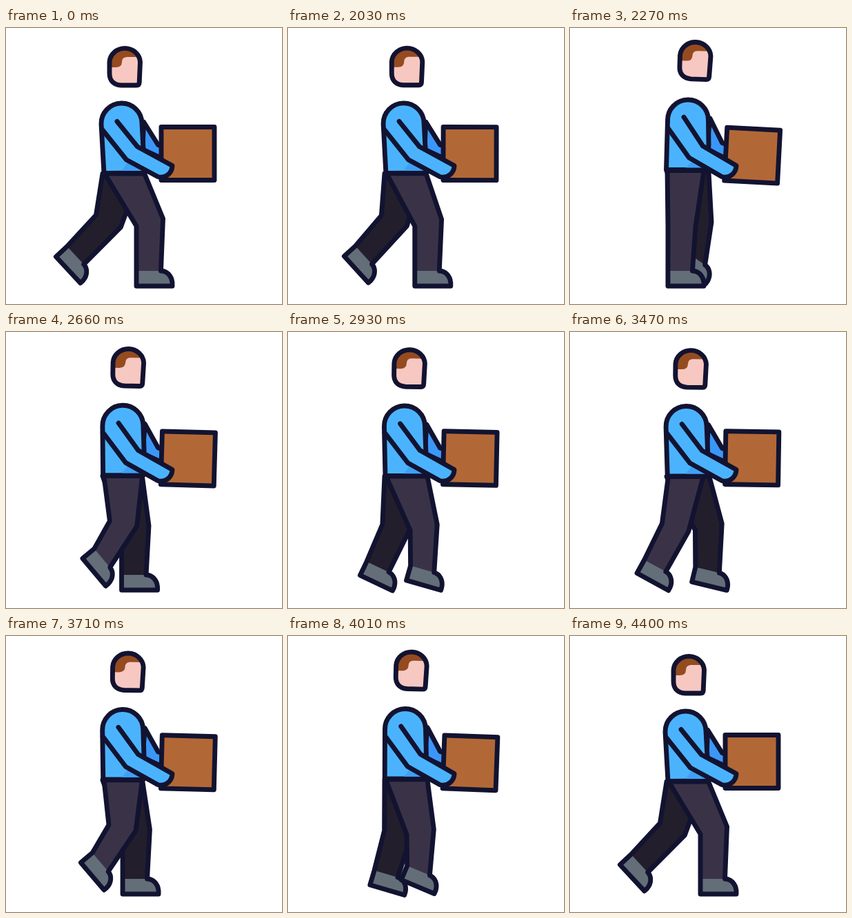
An HTML page for the animation above (4.43 s loop, 400 px wide and 400 px high).

```html
<!DOCTYPE html>
<html lang="en">
<head>
<meta charset="utf-8">
<title>Carrying a box</title>
<style>
  html, body { margin: 0; width: 100%; height: 100%; overflow: hidden; background: #fff; }
  svg { display: block; width: 100vw; height: 100vh; }
  .line { stroke: #121331; stroke-width: 6.9; stroke-linejoin: round; stroke-linecap: round; }
</style>
</head>
<body>
<svg viewBox="0 0 400 400">
  <path id="farArm" class="line" fill="#3b97f7"/>
  <g id="farLeg"><path fill="#231e2b"/><path fill="#646e78"/><path class="line" fill="none"/></g>
  <g id="nearLeg"><path fill="#3a3347"/><path fill="#646e78"/><path class="line" fill="none"/></g>
  <path id="torso" class="line" fill="#4bb3fd"/>
  <path id="shade" fill="#3fa0f6"/>
  <rect id="box" class="line" x="225" y="143.5" width="77" height="77" fill="#b26836"/>
  <path id="nearArm" class="line" fill="#4bb3fd"/>
  <g id="head">
    <path id="face" fill="#f7c8c1" d="M150 49A22.3 21 0 0 1 194.5 49L193.2 79Q193 83 189 83H167C156 82.5 150 76 150 66Z"/>
    <path fill="#954b20" d="M150 57V49A22.3 21 0 0 1 193 42H175Q168 42.5 168 49Q168 57 159 57Z"/>
    <path id="headLine" class="line" fill="none"/>
  </g>
</svg>
<script>
const LOOP = 4430, HOLD = 2000, STEP = 30, STEPS = 80;
const $ = id => document.getElementById(id);
const set = (id, d) => $(id).setAttribute('d', d);
const move = (id, x, y, turn) => $(id).setAttribute('transform', `translate(${x} ${y}) rotate(${turn})`);
const mix = (a, b, u) => a + (b - a) * u;
set('headLine', $('face').getAttribute('d'));

// Key poses of one leg over a cycle of two strides
const gait = [
  { at: 0, knee: [189, 287], ankle: [189, 352], tilt: 0 },        // contact
  { at: .516, knee: [142, 288], ankle: [142, 352], tilt: 0 },     // passing
  { at: 1, knee: [128, 271], ankle: [86, 316.5], tilt: 47 },      // push-off
  { at: 1.27, knee: [151, 274], ankle: [129, 314], tilt: 50 },    // lift
  { at: 1.516, knee: [163, 288], ankle: [164, 323], tilt: 35 }    // swing
];

function drawLeg(id, phase, dx, hipX, hipY) {
  const q = phase % 2;
  const i = gait.findLastIndex(g => g.at <= q);
  const a = gait[i], b = gait[i + 1] || { ...gait[0], at: 2 };
  const u = (q - a.at) / (b.at - a.at);
  const joint = name => [mix(a[name][0], b[name][0], u) + dx, mix(a[name][1], b[name][1], u)];
  const [kx, ky] = joint('knee'), [ax, ay] = joint('ankle');

  const r = mix(a.tilt, b.tilt, u) * Math.PI / 180, s = Math.sin(r), c = Math.cos(r);
  const foot = (x, y) => `${ax + x * c - y * s} ${ay + x * s + y * c}`;
  const shoe = `${foot(0, 0)}L${foot(0, 22)}L${foot(52, 22)}L${foot(52, 17)}` +
    `C${foot(51, 7)} ${foot(44, 0)} ${foot(35.5, 0)}`;

  // The front of the knee lies across the bisector of thigh and shin
  const lean = (Math.atan2(hipX - kx, ky - hipY) + Math.atan2(kx - ax, ay - ky)) / 2;
  const front = `${kx + 40 * Math.cos(lean)} ${ky + 40 * Math.sin(lean)}`;
  const hipFront = 197.5 + 4.5 * Math.cos(Math.PI * (q + .25));

  const leg = `M${hipX} ${hipY}L${kx} ${ky}L${shoe}L${front}L${hipFront} ${hipY}Z`;
  [leg, `M${shoe}Z`, leg].forEach((d, n) => $(id).children[n].setAttribute('d', d));
}

// Steady walk that eases out into the resting pose
function stride(k) {
  const speed = .0574, from = 50;
  if (k < from) return k * speed;
  const left = 4 - from * speed, span = STEPS - from;
  return 4 - left * ((STEPS - k) / span) ** (speed * span / left);
}

function draw(p) {
  const bob = Math.sin(Math.PI * p) ** 2;
  const m = (a, b) => mix(a, b, bob);
  const pt = (x, y, dx, dy) => `${x + dx * bob} ${y + dy * bob}`;
  const waist = m(210, 205.5);

  drawLeg('farLeg', p + 1, 2.5, 140, waist + 1);
  drawLeg('nearLeg', p, 0, m(143, 141), waist + 1);
  set('farArm', `M${pt(199.5, 136, 3.5, -5)}L${pt(220.5, 169.5, 0, -3)}L228 ${m(171, 169)}V190L198 176Z`);
  set('torso', `M${pt(138, 139, 3.5, -5)}A29.5 29.5 0 0 1 ${pt(197, 138, 3.5, -5)}` +
    `L${pt(199, 175, 2, -5)}L${pt(201, 210, -4, -4.5)}L${pt(142, 210.5, -2.5, -5)}Z`);
  set('shade', `M178 192L196 ${waist - 3}H168Z`);
  set('nearArm', `M${pt(161, 135.5, 4, -6.5)}L${pt(190.5, 172, 2, -1)}L241 199.5` +
    `C241 209 232 219 220 215.5L${pt(174.5, 191, -2, -3)}L${pt(138.5, 146, 3.5, -1)}`);
  $('box').setAttribute('transform', `translate(${-.5 * bob} ${bob}) rotate(${3 * bob} 233 205)`);
  move('head', 9.3 * bob, -9 * bob, `${2 * bob} 172 55`);
}

function tick() {
  const t = performance.now() % LOOP;
  const k = Math.floor((t - HOLD) / STEP + 1e-6);
  draw(stride(Math.min(STEPS, Math.max(0, k))));
  requestAnimationFrame(tick);
}
tick();
</script>
</body>
</html>
```
